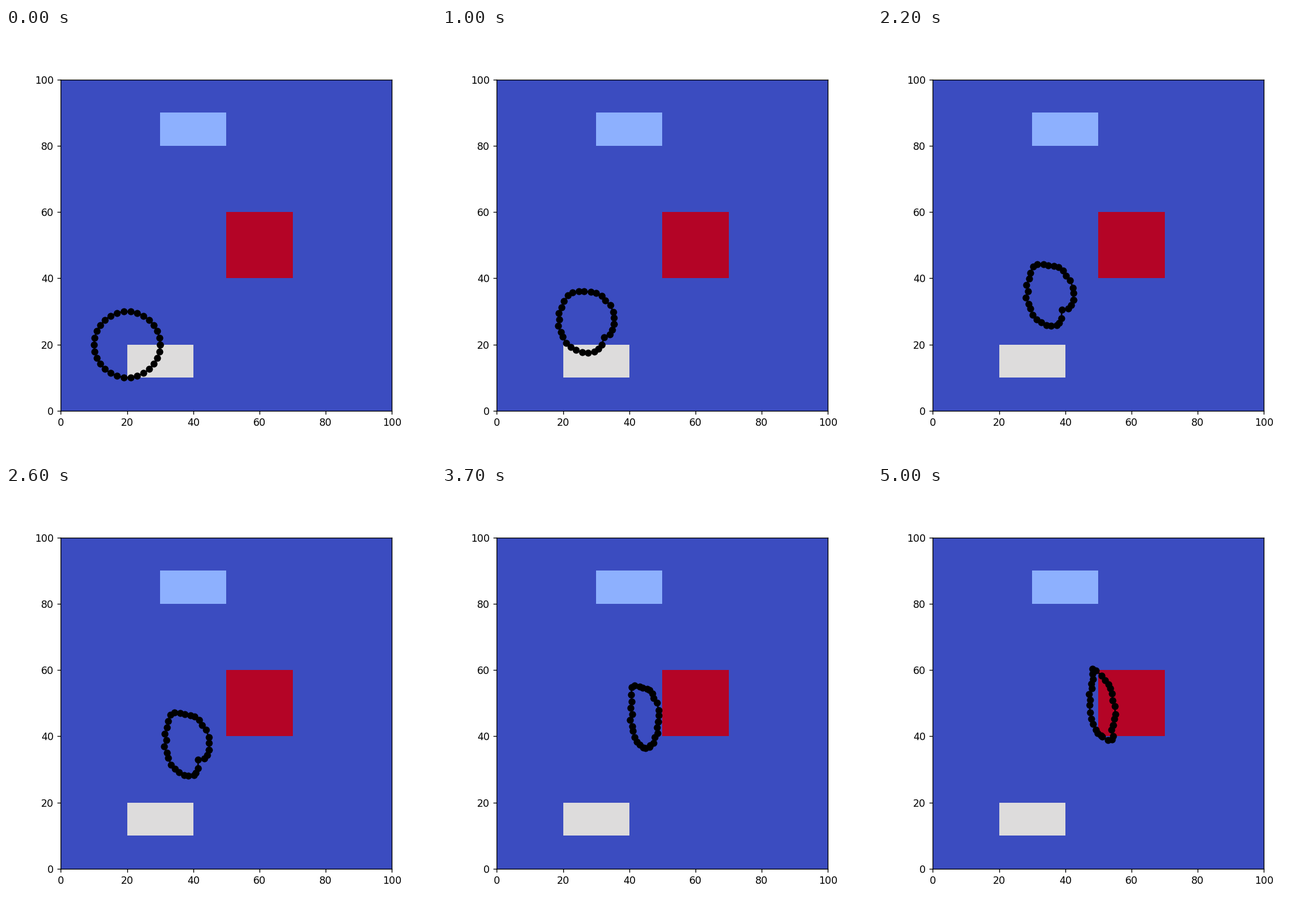
A matplotlib script that plays this animation: 748 px wide and 748 px high, repeating every 5.1 s.

```python
import numpy as np
import matplotlib.pyplot as plt
from matplotlib.animation import FuncAnimation
from matplotlib.patches import Rectangle

SIZE, DPI = 748, 125
FRAMES, INTERVAL = 51, 100
N = 30

index = np.arange(N)
angle = 2 * np.pi * index / N
rng = np.random.default_rng(4)
rough = 0.17 * (rng.normal(size=N) + 1j * rng.normal(size=N))

# The ring as a sheared ellipse: time, centre, cosine axis, sine axis, dent
KEYS = [
    (0, 20 + 20j, 10, 10j, 0),
    (15, 30.6 + 30.3j, 7.7 - 1.1j, 0.6 + 8.9j, 1.8),
    (31, 41.6 + 40.7j, 6.3 - 1.6j, 0.2 + 9.4j, 1.8),
    (37, 44.7 + 45.6j, 4.2 - 1.2j, 0.2 + 9j, 0.2),
    (42, 48.6 + 48.4j, 5 - 3.2j, 0.8 + 8.7j, -0.5),
    (50, 51.1 + 49j, 3.4 - 5.5j, 1.6 + 7.4j, -1.4),
]
times, *tracks = zip(*KEYS)


def bump(middle, width):
    return np.exp(-((index - middle) / width) ** 2)


def ring(t):
    centre, across, up, dent = (np.interp(t, times, track) for track in tracks)
    z = centre + across * np.cos(angle) + up * np.sin(angle)
    # a dent at the lower right and a growing corner at the upper left
    corner = 0.042 * t
    z = z + (-1 + 1j) * (dent * bump(27, 1.3) + corner * bump(10.8, 1.6))
    z = z + rough * min(t / 12, 1)
    return np.append(z, z[0])


def block(x, y, w, h, level):
    ax.add_patch(Rectangle((x, y), w, h, lw=0, fc=plt.cm.coolwarm(level)))


fig, ax = plt.subplots(figsize=(SIZE / DPI, SIZE / DPI), dpi=DPI)
ax.set(xlim=(0, 100), ylim=(0, 100), aspect="equal",
       facecolor=plt.cm.coolwarm(0.0))
block(50, 40, 20, 20, 1.0)
block(20, 10, 20, 10, 0.5)
block(30, 80, 20, 10, 0.25)
line, = ax.plot([], [], "ko-")


def update(frame):
    z = ring(frame)
    line.set_data(z.real, z.imag)
    return line,


anim = FuncAnimation(fig, update, frames=FRAMES, interval=INTERVAL,
                     repeat=True, repeat_delay=0)
plt.show()
```
